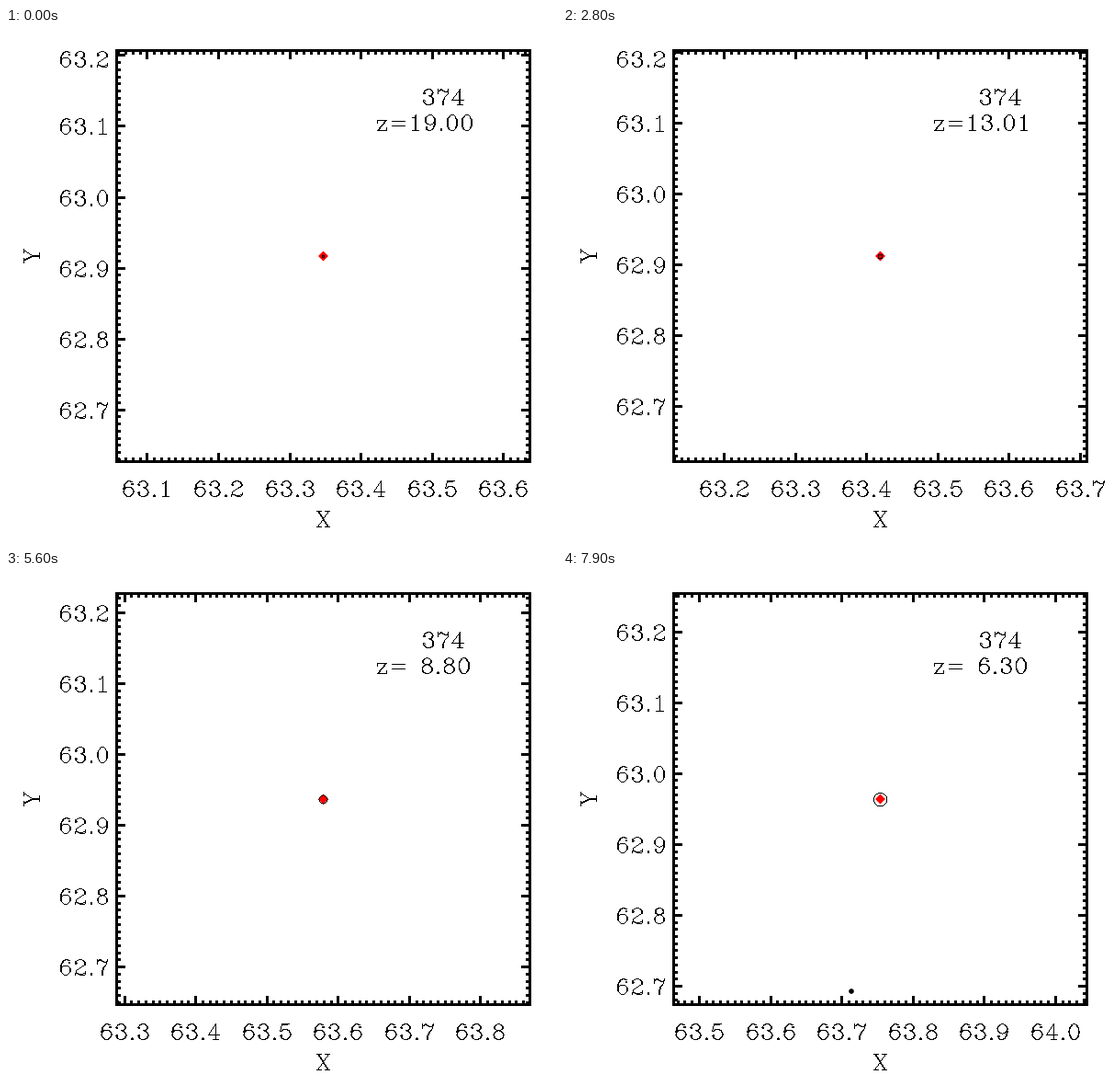
Recreate the animation shown at these times as a matplotlib script. Size 600 by 560 pixels, loop 8000 ms.

```python
import numpy as np
import matplotlib.pyplot as plt
from matplotlib.animation import FuncAnimation
from matplotlib.collections import LineCollection
from matplotlib.patches import Circle, Polygon

W, H, DPI = 600, 560, 100
PX = 72 / DPI
LEFT, RIGHT, TOP, BOTTOM = 120.5, 570.5, 24.5, 471.5
CX, CY = (LEFT + RIGHT) / 2, (TOP + BOTTOM) / 2
HALF = 0.29  # half of the visible range
FRAMES, INTERVAL = 80, 100
UNIT = 0.8  # pixels per glyph unit

# Tracked object: frame, redshift, x, y
PATH = np.array([
    (0, 19.00, 63.347, 62.917),
    (20, 14.50, 63.398, 62.920),
    (28, 13.01, 63.419, 62.912),
    (40, 11.00, 63.478, 62.918),
    (49, 9.71, 63.534, 62.929),
    (63, 7.96, 63.624, 62.945),
    (79, 6.30, 63.754, 62.964),
]).T


# Stroke font: x from the glyph centre, y up from the baseline.
def line(*xy):
    return [np.reshape(xy, (-1, 2)).astype(float)]


def arc(cx, cy, rx, ry, a0=0, a1=360):
    a = np.radians(np.linspace(a0, a1, 25))
    return [np.column_stack([cx + rx * np.cos(a), cy + ry * np.sin(a)])]


def bowl(cx, cy, rx, ry, a0=0, a1=360):
    return arc(cx, cy, rx, ry, a0, a1) + arc(cx, cy, rx - 1, ry, a0, a1)


def ball(x, y):
    return arc(x, y, 1, 1)


def serif(x, y, half=3):
    return line(x - half, y, x + half, y)


def turned(strokes):
    return [(0, 21) - s for s in strokes]


SIX = bowl(0, 6.5, 7, 6.5) + bowl(1, 9, 8, 12, 60, 175) + ball(5, 17)

GLYPHS = {
    " ": [],
    "0": bowl(0, 10.5, 7, 10.5),
    "1": line(-4, 17, -2, 18, 1, 21, 1, 0) + line(0, 20, 0, 0) + serif(0.5, 0, 4.5),
    "2": (arc(0, 16, 7, 5, 180, 90) + bowl(0, 16, 7, 5, 90, -30) + ball(-6, 16)
          + line(6, 13.5, -2, 9, -6, 6, -7, 0) + line(5, 13.5, -2, 9)
          + line(-7, 2, -4, 3, 1, 1, 6, 2, 7, 5) + line(-4, 3, 1, 0, 5, 0, 7, 3)),
    "3": (arc(0, 16.5, 6, 4.5, 170, 90) + bowl(0, 16.5, 6, 4.5, 90, -90)
          + bowl(0, 6, 7, 6, 90, -90) + arc(0, 6, 7, 6, -90, -170)
          + ball(-6, 16) + ball(-6, 5)),
    "4": line(2, 19, 2, 0) + line(3, 0, 3, 21, -8, 6, 8, 6) + serif(2.5, 0, 3.5),
    "5": (line(-5, 21, -7, 11) + arc(0, 7, 7, 7, 145, 90) + bowl(0, 7, 7, 7, 90, -90)
          + arc(0, 7, 7, 7, -90, -160) + ball(-6, 5)
          + serif(0, 21, 5) + line(-5, 20, 0, 20, 5, 21)),
    "6": SIX,
    "7": (line(-7, 21, -7, 15) + line(-7, 17, -4, 21, -2, 21, 3, 18, 5, 18, 7, 21)
          + line(-6, 19, -4, 20, -2, 20, 3, 18)
          + line(7, 21, 6, 15, 2, 10, 0, 5, 0, 0) + line(6, 15, 1, 10, -1, 5, -1, 0)),
    "8": bowl(0, 16.5, 6, 4.5) + bowl(0, 6, 7, 6),
    "9": turned(SIX),
    ".": ball(0, 1),
    "=": serif(0, 12, 9) + serif(0, 6, 9),
    "z": (line(6, 14, -6, 0) + line(7, 14, -5, 0)
          + line(-6, 10, -6, 14, 7, 14) + line(-6, 0, 7, 0, 7, 4)),
    "X": (line(-7, 21, 6, 0) + line(-6, 21, 7, 0) + line(7, 21, -7, 0)
          + serif(-6, 21) + serif(6, 21) + serif(-6, 0) + serif(6, 0)),
    "Y": (line(-7, 21, 0, 10, 0, 0) + line(-6, 21, 1, 10, 1, 0) + line(8, 21, 1, 10)
          + serif(-6, 21) + serif(7, 21) + serif(0.5, 0, 3.5)),
}
WIDTHS = {" ": 16, ".": 10, "=": 26}


def text(s, x, base, align=0.0, upright=True):
    """Strokes of a string; align 0 / 0.5 / 1 is left / centre / right."""
    sizes = [WIDTHS.get(c, 20) * UNIT for c in s]
    pen = -align * sum(sizes)
    out = []
    for c, size in zip(s, sizes):
        for stroke in GLYPHS[c]:
            u, v = stroke.T * UNIT
            u = u + pen + size / 2
            pos = (x + u, base - v) if upright else (x - v, base - u)
            out.append(np.column_stack(pos))
        pen += size
    return out


def ink(image, strokes):
    """Plot one-pixel lines without smoothing."""
    for stroke in strokes:
        p = np.floor(stroke)
        for a, b in zip(p[:-1], p[1:]):
            n = int(np.abs(b - a).max()) + 1
            x, y = np.floor(np.linspace(a, b, n) + 0.5).astype(int).T
            image[y, x, 3] = 255


def ticks(center, middle, length):
    """Hundredths in view with their pixel positions."""
    lo = int(np.ceil((center - HALF) * 100))
    hi = int(np.floor((center + HALF) * 100))
    for k in range(lo, hi + 1):
        pos = np.floor(middle + (k / 100 - center) / HALF * length / 2) + 0.5
        yield k, pos, 9.5 if k % 10 == 0 else 4.5


fig = plt.figure(figsize=(W / DPI, H / DPI), dpi=DPI, facecolor="white")
ax = fig.add_axes([0, 0, 1, 1])
ax.axis("off")

frame = [(LEFT, TOP), (RIGHT, TOP), (RIGHT, BOTTOM), (LEFT, BOTTOM)]
ax.add_patch(Polygon(frame, fill=False, ec="black", lw=3 * PX, joinstyle="miter",
                     snap=False))
tick_lines = LineCollection([], colors="black", linewidths=3 * PX, capstyle="butt")
tick_lines.set_snap(False)
ax.add_collection(tick_lines, autolim=False)

D = 5.5
ax.add_patch(Polygon([(CX - D, CY), (CX, CY - D), (CX + D, CY), (CX, CY + D)],
                     fc="red", ec="none"))
visitor = ax.add_patch(Circle((314, 457), 2.8, fc="black", ec="none"))

fixed = np.zeros((H, W, 4), np.uint8)
ink(fixed, text("X", CX, 542.5, 0.5) + text("Y", 36.5, CY, 0.5, upright=False)
    + text("    374", 401, 83.5))
page = ax.imshow(fixed, extent=(0, W, H, 0), interpolation="nearest",
                 aspect="auto", zorder=3)
ax.set_xlim(0, W)
ax.set_ylim(H, 0)


def update(i):
    log_z, xc, yc = (np.interp(i, PATH[0], row)
                     for row in (np.log1p(PATH[1]), PATH[2], PATH[3]))
    radius = 1.2 + 6.1 * (i / (FRAMES - 1)) ** 1.7

    strokes = text(f"z={np.expm1(log_z):5.2f}", 401, 111.5)
    strokes += arc(CX, CY + 0.5, radius, radius)
    marks = []
    for k, x, size in ticks(xc, CX, RIGHT - LEFT):
        marks += [[(x, BOTTOM), (x, BOTTOM - size)], [(x, TOP), (x, TOP + size)]]
        if k % 10 == 0:
            strokes += text(f"{k / 100:.1f}", x, 509.5, 0.5)
    for k, y, size in ticks(yc, CY, TOP - BOTTOM):
        marks += [[(LEFT, y), (LEFT + size, y)], [(RIGHT, y), (RIGHT - size, y)]]
        if k % 10 == 0:
            strokes += text(f"{k / 100:.1f}", 113, max(y + 9, 42.5), 1)

    image = fixed.copy()
    ink(image, strokes)
    page.set_data(image)
    tick_lines.set_segments(marks)
    # A second body drifts in from below near the end.
    visitor.center = (314, 457 + 3.3 * (FRAMES - 1 - i))
    visitor.set_visible(visitor.center[1] < BOTTOM - 3)
    return page, tick_lines, visitor


anim = FuncAnimation(fig, update, frames=FRAMES, interval=INTERVAL,
                     repeat=True, repeat_delay=0, blit=False)
plt.show()
```
